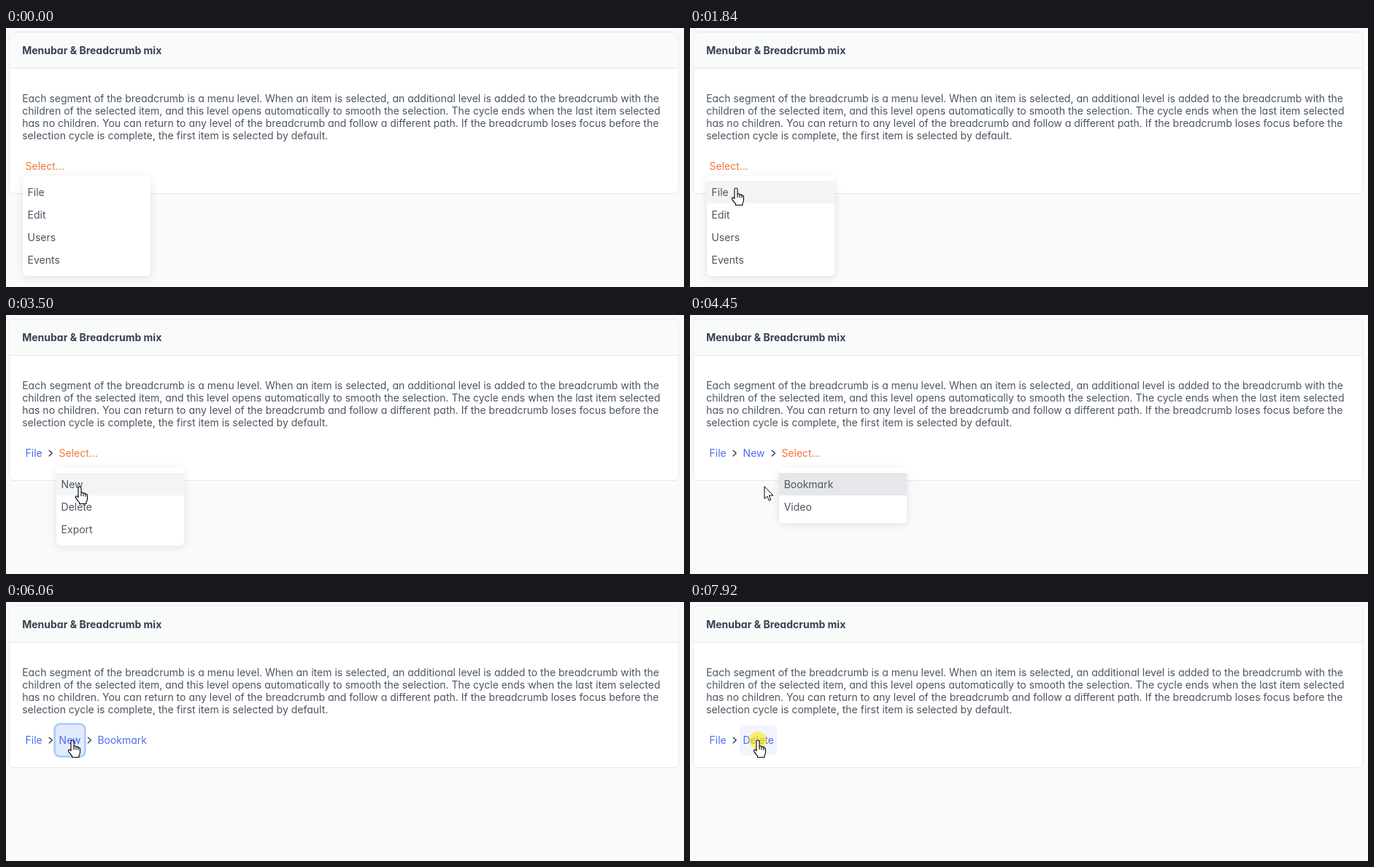
These frames come from a looping animation (929 by 356 pixels, 7990 ms). An HTML page:

```html
<!DOCTYPE html>
<html lang="en">
<head>
<meta charset="utf-8">
<title>Menubar &amp; Breadcrumb mix</title>
<style>
  html, body { margin: 0; width: 100%; height: 100%; overflow: hidden; background: #f9fafa; }
  body {
    position: relative;
    font: 14px/17px Inter, "Inter var", sans-serif;
    font-feature-settings: "cv02", "cv03", "cv04", "cv11";
    color: #4b5563;
  }
  body * { position: absolute; box-sizing: border-box; white-space: pre; }
  .panel {
    left: 4px; top: 5px; width: 918px; height: 223px;
    background: #fff; border: 1px solid #e4e9ea; border-radius: 6px; overflow: hidden;
  }
  .head { left: 0; top: 0; width: 100%; height: 50px; background: #f9fafa; border-bottom: 1px solid #e4e9ea; }
  h1 { left: 22.2px; top: 22px; margin: 0; font-size: 14px; font-weight: 700; color: #374151; }
  p { left: 22.2px; top: 88px; margin: 0; }
  .crumb { top: 169px; height: 42px; padding: 12px 4.4px 13px; border-radius: 6px; color: #4f6cf0; }
  .crumb.pick { color: #f07836; }
  .crumb.over { background: #f2f5fe; }
  .crumb.ring { background: #e1ebfd; box-shadow: 0 0 0 2.8px #b0cbfb; }
  .menu {
    width: 175px; background: #fff; border-radius: 6px;
    box-shadow: 0 2px 12px rgba(0, 0, 0, .1); transform-origin: 50% 0;
  }
  .row { left: 0; width: 100%; height: 31px; padding: 7px; }
  .dot { width: 24px; height: 24px; margin: -12px; border-radius: 50%; background: rgba(255, 235, 0, .6); }
  svg { left: 0; top: 0; overflow: visible; fill: none; stroke-linecap: round; stroke-linejoin: round; }
</style>
</head>
<body>
<div class="panel"><div class="head"></div></div>
<h1>Menubar &amp; Breadcrumb mix</h1>
<p>Each segment of the breadcrumb is a menu level. When an item is selected, an additional level is added to the breadcrumb with the
children of the selected item, and this level opens automatically to smooth the selection. The cycle ends when the last item selected
has no children. You can return to any level of the breadcrumb and follow a different path. If the breadcrumb loses focus before the
selection cycle is complete, the first item is selected by default.</p>
<script>
const LOOP = 7990, STEP = 70, FADE = 140, ROW = 31, PAD = 7;
const LEFTS = [22.2, 68.2, 121];

const TRAILS = [
  { until: 1980, path: ['Select...'] },
  { until: 3840, path: ['File', 'Select...'] },
  { until: 5010, path: ['File', 'New', 'Select...'] },
  { until: 6890, path: ['File', 'New', 'Bookmark'] },
  { until: LOOP, path: ['File', 'Delete'] }
];

const FILE = ['New', 'Delete', 'Export'];
const MENUS = [
  { x: 22.5, y: 203, open: -FADE, close: 1980, items: ['File', 'Edit', 'Users', 'Events'] },
  { x: 68.6, y: 210, open: 2050, close: 3840, items: FILE, focus: true },
  { x: 121.7, y: 210, open: 3910, close: 5010, items: ['Bookmark', 'Video'], focus: true },
  { x: 68.6, y: 210, open: 6130, close: 6890, items: FILE, focus: true, checked: true }
];

// start, end, from x, from y, to x, to y
const MOVES = [
  [660, 1500, 92, 360, 63, 221],
  [1500, 1570, 63, 221, 63, 220],
  [2180, 2600, 63, 220, 61, 227],
  [2800, 3500, 61, 227, 101, 236],
  [4380, 4450, 101, 236, 102, 236],
  [4450, 4940, 102, 236, 157, 229],
  [5220, 5850, 157, 229, 91, 190],
  [6200, 6690, 91, 190, 98, 262],
  [7290, 7920, 98, 262, 93, 190]
];
const CLICKS = [1910, 3770, 4940, 5990, 6820, 7920];
const ENTER = 730, RING = [5990, 6200];

const HAND = 'M-2 2Q-2 0 0 0Q2 0 2 2V8.6Q2.6 7.6 3.8 7.8Q5 8 5 9.4Q5.8 8.6 6.8 8.9Q8 9.2 8 10.6' +
  'Q8.6 9.9 9.5 10.3Q10.5 10.8 10.5 12V16.5Q10.4 19 9 21V23.5H-.5V21.6Q-3 19.2-5.3 15.4Q-6 13.6-4.8 12.9' +
  'Q-3.4 12.4-2 14.6ZM2 8.6V12.4M5 9.4V12.8M8 10.6V13.2';
const ARROW = 'M0 0V16.5L3.8 13L6.3 19L8.8 18L6.3 12H11.5Z';

const clamp = v => Math.max(0, Math.min(1, v));
const ease = p => p * p * (3 - 2 * p);
const inside = (p, x, y, w, h) => p.x >= x && p.x < x + w && p.y >= y && p.y < y + h;

function add(parent, cls, text) {
  const el = document.createElement('div');
  el.className = cls;
  el.textContent = text || '';
  parent.append(el);
  return el;
}

function addPath(parent, d, stroke, width, fill) {
  const ns = 'http://www.w3.org/2000/svg';
  const svg = document.createElementNS(ns, 'svg');
  const path = document.createElementNS(ns, 'path');
  const attrs = { d, stroke, 'stroke-width': width, fill: fill || 'none' };
  for (const key in attrs) path.setAttribute(key, attrs[key]);
  svg.setAttribute('width', 1);
  svg.setAttribute('height', 1);
  svg.append(path);
  parent.append(svg);
  return svg;
}

const show = (el, on) => { el.style.visibility = on ? 'visible' : 'hidden'; };

const crumbs = LEFTS.map(x => {
  const el = add(document.body, 'crumb');
  el.style.left = x + 'px';
  return el;
});
const arrows = [61.2, 114.4].map(x =>
  addPath(document.body, `M${x - 2} 186.2L${x + 2} 190L${x - 2} 193.8`, '#374151', 1.5));

for (const m of MENUS) {
  m.h = m.items.length * ROW + 2 * PAD;
  m.el = add(document.body, 'menu');
  Object.assign(m.el.style, { left: m.x + 'px', top: m.y + 'px', height: m.h + 'px' });
  m.rows = m.items.map((name, i) => {
    const row = add(m.el, 'row', name);
    row.style.top = PAD + i * ROW + 'px';
    return row;
  });
  if (m.checked) addPath(m.rows[0], 'M154 14.5L158 18.5L167 9.5', '#2c7a55', 1.5);
}

const dot = add(document.body, 'dot');
const hand = addPath(document.body, HAND, '#000', 1.1, '#fff');
const arrow = addPath(document.body, ARROW, '#000', 1, '#fff');

function pointer(t) {
  let pos = { x: MOVES[0][2], y: MOVES[0][3] };
  for (const [a, b, x0, y0, x1, y1] of MOVES) {
    if (t < a) break;
    const p = ease(clamp(Math.floor((t - a) / STEP) * STEP / (b - a)));
    pos = { x: x0 + (x1 - x0) * p, y: y0 + (y1 - y0) * p };
  }
  return pos;
}

function drawCrumbs(t, pos) {
  const path = TRAILS.find(s => t < s.until).path;
  let hit = false;
  crumbs.forEach((el, i) => {
    const name = path[i] || '';
    if (el.textContent !== name) el.textContent = name;
    show(el, name);
    const over = name && t >= ENTER && inside(pos, LEFTS[i], 169, el.offsetWidth, 42);
    hit = hit || over;
    el.classList.toggle('pick', name === 'Select...');
    el.classList.toggle('over', !!over);
    el.classList.toggle('ring', i === 1 && t >= RING[0] && t < RING[1]);
  });
  arrows.forEach((el, i) => show(el, i < path.length - 1));
  return hit;
}

function drawMenu(m, t, pos) {
  const grow = clamp((t - m.open) / FADE);
  const alpha = Math.min(grow, 1 - clamp((t - m.close) / FADE));
  m.el.style.opacity = alpha;
  m.el.style.transform = `scaleY(${0.8 + 0.2 * grow})`;
  show(m.el, alpha > 0);
  const live = alpha > 0 && t >= ENTER;
  const hits = m.rows.map((row, i) => live && inside(pos, m.x, m.y + PAD + i * ROW, 175, ROW));
  const any = hits.includes(true);
  m.rows.forEach((row, i) => {
    const strong = m.focus && i === 0 && (m.checked || !any);
    row.style.background = strong ? '#e5e7eb' : hits[i] ? '#f3f4f6' : 'none';
  });
  return any;
}

function place(el, pos) {
  el.style.left = pos.x + 'px';
  el.style.top = pos.y + 'px';
}

function draw(now) {
  const t = now % LOOP;
  const pos = pointer(t);
  let link = drawCrumbs(t, pos);
  for (const m of MENUS) link = drawMenu(m, t, pos) || link;
  [dot, hand, arrow].forEach(el => place(el, pos));
  show(dot, CLICKS.some(c => t >= c && t < c + STEP));
  show(hand, t >= ENTER && link);
  show(arrow, t >= ENTER && !link);
}

const start = performance.now();
function tick() {
  draw(performance.now() - start);
  requestAnimationFrame(tick);
}
draw(0);
requestAnimationFrame(tick);
</script>
</body>
</html>
```
